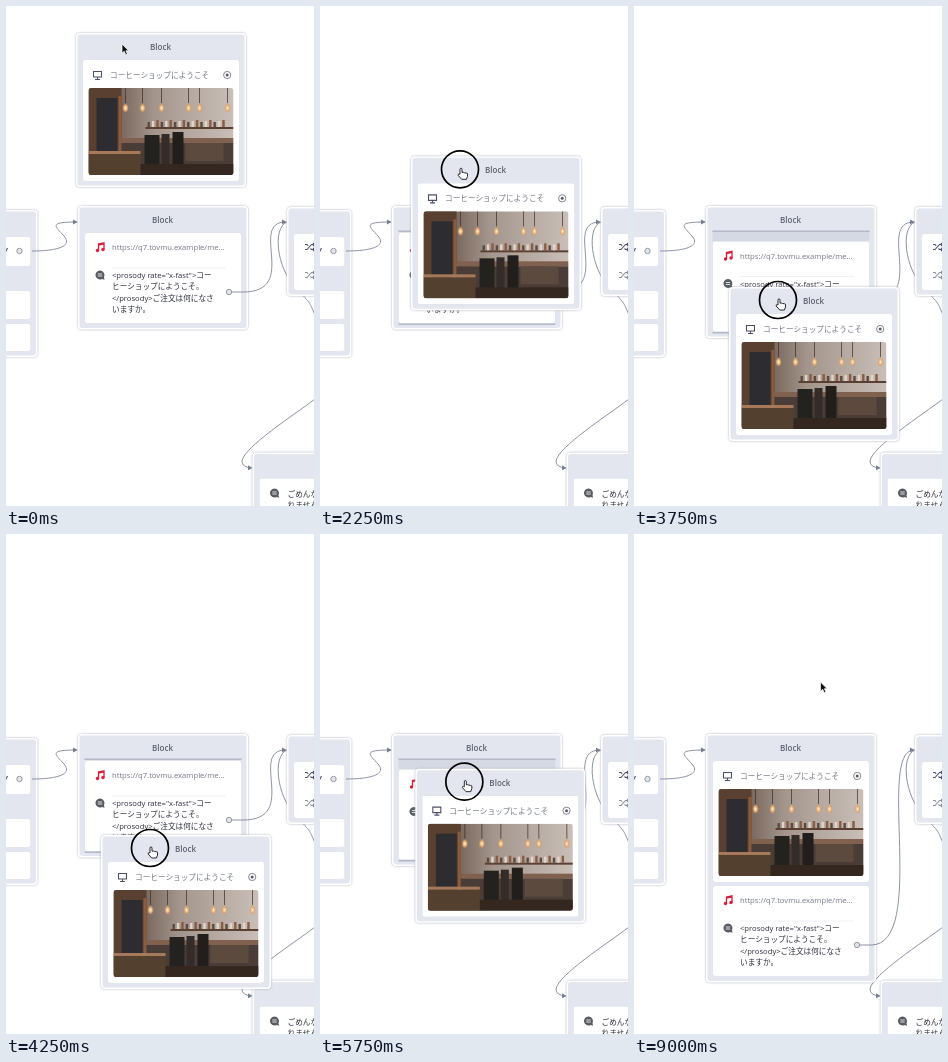
Animation of 308 by 500 pixels, one loop 9.25 s. Source, as an HTML page:

```html
<!DOCTYPE html>
<html lang="ja">
<head>
<meta charset="utf-8">
<title>Block drag</title>
<style>
html, body { margin: 0; width: 100%; height: 100%; overflow: hidden; background: #fff; }
svg { display: block; width: 100vw; height: 100vh; }
text { font: 7.65px "Open Sans", "Noto Sans CJK JP", "Noto Sans CJK", sans-serif; fill: #2c2f3c; }
.title { font-size: 8px; font-weight: 600; fill: #5d6270; text-anchor: middle; }
.soft { fill: #747986; }
.rim { fill: #fff; filter: drop-shadow(0 0 1.2px #a9afc0); }
.body { fill: #e3e6ee; }
.card { fill: #fff; filter: drop-shadow(0 .4px .5px #c3c8d5); }
.wire { fill: none; stroke: #8d92a6; stroke-width: 1; }
.port { fill: #e3e5ea; stroke: #8a8f9c; stroke-width: .9; }
.icon { fill: none; stroke: #4b5068; stroke-width: 1.1; }
.edge { fill: #b3b9c8; }
</style>
</head>
<body>
<svg viewBox="0 0 308 500" preserveAspectRatio="none">
  <defs>
    <marker id="tip" markerWidth="5" markerHeight="6" refX="4" refY="3" orient="auto" markerUnits="userSpaceOnUse">
      <path d="M0 .5L4.5 3L0 5.5z" fill="#767c92"/>
    </marker>
    <linearGradient id="wall">
      <stop offset=".2" stop-color="#75645a"/><stop offset=".45" stop-color="#a3958c"/>
      <stop offset="1" stop-color="#c9bfb8"/>
    </linearGradient>
    <radialGradient id="glow">
      <stop offset="0" stop-color="#fff0cf"/><stop offset=".5" stop-color="#e9b27a"/>
      <stop offset="1" stop-color="#c98a50" stop-opacity="0"/>
    </radialGradient>
    <clipPath id="frame"><rect width="145" height="87" rx="3"/></clipPath>
    <g id="speech">
      <path d="M0-4.5A4.5 4.5 0 1 0 2 4L4.5 4.8L4 2A4.5 4.5 0 0 0 0-4.5z" fill="#585b62"/>
      <path d="M-2.2-1H2.2M-2.2 1H2.2" stroke="#fff" stroke-width=".8"/>
    </g>
    <g id="shuffle" class="icon">
      <path d="M-4.5 2.5H-2.5L2-2.5H5M-4.5-2.5H-2.5L-1.3-1.2M1 1.5L2 2.5H5M3.5-4L5-2.5L3.5-1M3.5 1L5 2.5L3.5 4"/>
    </g>
    <g id="imageCard">
      <rect class="card" x="7" y="27" width="156" height="121" rx="2"/>
      <path class="icon" d="M17.5 38.5H25.5V44H17.5zM21.5 44V46.3M19 46.5H24"/>
      <text class="soft" x="34" y="45">コーヒーショップにようこそ</text>
      <circle cx="151.2" cy="42" r="3.6" fill="#fff" stroke="#747986" stroke-width=".9"/>
      <circle cx="151.2" cy="42" r="1.5" fill="#555a6a"/>
      <g id="photo" transform="translate(12.5 55)" clip-path="url(#frame)"></g>
    </g>
    <path id="arrow" d="M0 0V9.2L2.2 7.3L3.8 10.8L5.4 10L3.9 6.7H6.6z" fill="#111" stroke="#fff" stroke-width=".7"/>
    <path id="hand" d="M1 6V1.2Q1-.2 2 -.2T3 1.2V4.2L4.3 4L5.6 4.5L7 4.6L8.5 5.3V8L7.4 11H2.7L-.8 7Q-1.2 5.5 .2 5.6z" fill="#fff" stroke="#15161c" stroke-width=".9" stroke-linejoin="round"/>
    <path id="fist" d="M-.4 5.2L.6 2.6L2 2.1L3.6 1.7L5.2 2L7 2.4L8.2 4.2L7.8 7L6.8 9.4H2L-.2 7zM2.2 2.4V4.4M4 2V4.2M5.7 2.3V4.4" fill="#fff" stroke="#15161c" stroke-width=".9" stroke-linejoin="round"/>
  </defs>

  <g class="wire">
    <path d="M281 216C266 222 271 262 289 281S303 296 309 309"/>
    <path d="M309 393C288 409 238 441 236 455Q236 461.500 246 462" marker-end="url(#tip)"/>
  </g>

  <g transform="translate(-138.500 204)">
    <rect class="rim" width="170" height="147" rx="4"/>
    <rect class="body" x="1.500" y="1.500" width="167" height="144" rx="3"/>
    <rect class="card" x="7" y="27" width="156" height="29" rx="2"/>
    <rect class="card" x="7" y="81" width="156" height="28" rx="2"/>
    <rect class="card" x="7" y="114" width="156" height="27" rx="2"/>
    <path class="icon" d="M137.500 43L140 38"/>
  </g>

  <g transform="translate(281 201)">
    <rect class="rim" width="170" height="89" rx="4"/>
    <rect class="body" x="1.500" y="1.500" width="167" height="86" rx="3"/>
    <rect class="card" x="7" y="27" width="156" height="56" rx="2"/>
    <use href="#shuffle" x="22.500" y="40"/>
    <use href="#shuffle" x="22.500" y="68" opacity=".65"/>
  </g>

  <g transform="translate(246.500 446.500)">
    <rect class="rim" width="170" height="80" rx="4"/>
    <rect class="body" x="1.500" y="1.500" width="167" height="77" rx="3"/>
    <rect class="card" x="7" y="26" width="156" height="60" rx="2"/>
    <use href="#speech" x="22" y="40.500"/>
    <text x="35" y="44">ごめんなさい</text>
    <text x="35" y="55">れませんでし</text>
  </g>

  <g transform="translate(72 200)">
    <rect id="rim" class="rim" width="170" rx="4"/>
    <rect id="body" class="body" x="1.500" y="1.500" width="167" rx="3"/>
    <text class="title" x="84.500" y="17">Block</text>
    <rect id="slot" x="6.500" y="25" width="157" height="10" fill="#d5d9e3"/>
    <use id="dropped" href="#imageCard"/>
    <g id="speechCard">
      <rect class="card" x="7" y="27" width="156" height="90" rx="2"/>
      <path d="M20.500 44.500V38L26 36.800V43.500M20.500 39L26 37.800" fill="none" stroke="#d5203a" stroke-width="1.300"/>
      <circle cx="19.500" cy="44.500" r="1.700" fill="#d5203a"/><circle cx="25" cy="43.500" r="1.700" fill="#d5203a"/>
      <text class="soft" x="34" y="44">https://q7.tovmu.example/me...</text>
      <path d="M34 62H148" stroke="#eef0f4"/>
      <use href="#speech" x="22" y="69"/>
      <text x="34" y="72">&lt;prosody rate="x-fast"&gt;コー</text>
      <text x="34" y="83.400">ヒーショップにようこそ。</text>
      <text x="34" y="94.800">&lt;/prosody&gt;ご注文は何になさ</text>
      <text x="34" y="106.200">いますか。</text>
      <circle class="port" cx="151" cy="86" r="2.700"/>
      <rect id="bottomEdge" class="edge" x="6.500" y="117.500" width="157" height="1.500"/>
    </g>
    <rect id="topEdge" class="edge" x="6.500" y="24.500" width="157" height="1.500"/>
  </g>

  <g class="wire">
    <path d="M26 245C52 245 67 240 58 230S42 216 71 216" marker-end="url(#tip)"/>
    <path id="outWire" marker-end="url(#tip)"/>
  </g>
  <circle class="port" cx="13.500" cy="245" r="2.700"/>

  <g id="dragged">
    <rect class="rim" width="170" height="154" rx="4"/>
    <rect class="body" x="1.500" y="1.500" width="167" height="151" rx="3"/>
    <text class="title" x="84.500" y="17">Block</text>
    <use href="#imageCard"/>
  </g>

  <circle id="press" r="18.500" fill="none" stroke="#000" stroke-width="1.700"/>
  <use id="cursor"/>
</svg>
<script>
const LOOP = 9250, STEP = 250, DROP = 6250;
const el = id => document.getElementById(id);
const set = (id, attrs) => { for (const k in attrs) el(id).setAttribute(k, attrs[k]); };
const show = (id, on) => { el(id).style.display = on ? '' : 'none'; };
const between = (t, a, b) => t >= a && t < b;

// Soft, flat view of a café interior
const box = (x, y, w, h, fill) => `<rect x="${x}" y="${y}" width="${w}" height="${h}" fill="${fill}"/>`;
const lamps = [37, 54, 73, 100, 111, 139].map(x =>
  `<path d="M${x} 0V15" stroke="#3a2d26" stroke-width=".7"/><ellipse cx="${x}" cy="20" rx="3.4" ry="5" fill="url(#glow)"/>`).join('');
const bottles = Array.from({ length: 18 }, (_, i) =>
  box(59 + i * 4.4, 34 - i % 3, 2.4, 5 + i % 3, ['#5d4a3e', '#e0d5c9', '#8a5c42'][i % 3])).join('');
el('photo').innerHTML =
  box(0, 0, 145, 87, 'url(#wall)') + box(0, 0, 33, 87, '#5a4031') + box(8, 10, 21, 58, '#2d2d31') +
  box(30, 8, 3, 60, '#8a5c3e') + box(57, 39, 88, 2, '#5a4033') + bottles +
  box(33, 50, 112, 5, '#80604e') + box(33, 55, 112, 32, '#4a3c36') +
  box(0, 66, 52, 21, '#54402f') + box(0, 63, 52, 3, '#a5795a') +
  box(56, 47, 15, 34, '#24221f') + box(73, 46, 8, 34, '#332c28') + box(84, 44, 11, 38, '#211e1c') +
  box(97, 55, 38, 18, '#5d4a3f') + box(52, 76, 93, 11, '#33271f') + lamps;

const blockPath = [[1250, 70, 27], [1500, 79, 50], [1750, 89, 81], [2500, 92, 185], [2750, 92, 197],
  [3750, 95, 281], [4250, 95, 301], [4500, 95, 301], [5250, 96, 248], [6000, 95, 228]];
const cursorPath = [[0, 116, 38], [1000, 117, 41], [6250, 142, 239], [7000, 142, 241],
  [8000, 160, 262], [8250, 160, 262], [9000, 186.5, 148]];

function along(path, t) {
  const i = path.findIndex(p => p[0] > t);
  if (i === 0) return path[0].slice(1);
  if (i < 0) return path[path.length - 1].slice(1);
  const [t0, x0, y0] = path[i - 1], [t1, x1, y1] = path[i];
  const k = (t - t0) / (t1 - t0);
  return [x0 + (x1 - x0) * k, y0 + (y1 - y0) * k];
}

function draw(t) {
  const [bx, by] = along(blockPath, t);
  const held = between(t, 1250, DROP), isDropped = t >= DROP;
  const slotOpen = between(t, 3250, 4250) || between(t, 5500, DROP);
  const isTarget = between(t, 2250, DROP);
  const shift = isDropped ? 125 : slotOpen ? 8.5 : 0;

  set('rim', { height: 123.5 + shift });
  set('body', { height: 120.5 + shift });
  set('speechCard', { transform: `translate(0 ${shift})` });
  show('slot', slotOpen);
  show('topEdge', isTarget);
  show('bottomEdge', isTarget);
  show('dropped', isDropped);
  const y = 286 + shift;
  set('outWire', { d: `M226 ${y}H237C294 ${y} 242 216 280 216` });

  show('dragged', !isDropped);
  set('dragged', { transform: `translate(${bx} ${by})` });

  // The block trails the pointer a little while it picks up speed
  const lag = between(t, 1500, 2000) ? 6 : 0;
  const [cx, cy] = held ? [bx + 49, by + 13 + lag] : along(cursorPath, t);
  show('press', held);
  set('press', { cx, cy });
  const shape = between(t, 1500, 2250) ? 'fist' : between(t, 1000, 8500) ? 'hand' : 'arrow';
  set('cursor', { href: '#' + shape, x: held ? cx - 3 + (shape === 'hand' ? 2 : 0) : cx, y: held ? cy - 1 : cy });
}

function tick() {
  draw(Math.floor(performance.now() % LOOP / STEP) * STEP);
  requestAnimationFrame(tick);
}
tick();
</script>
</body>
</html>
```
